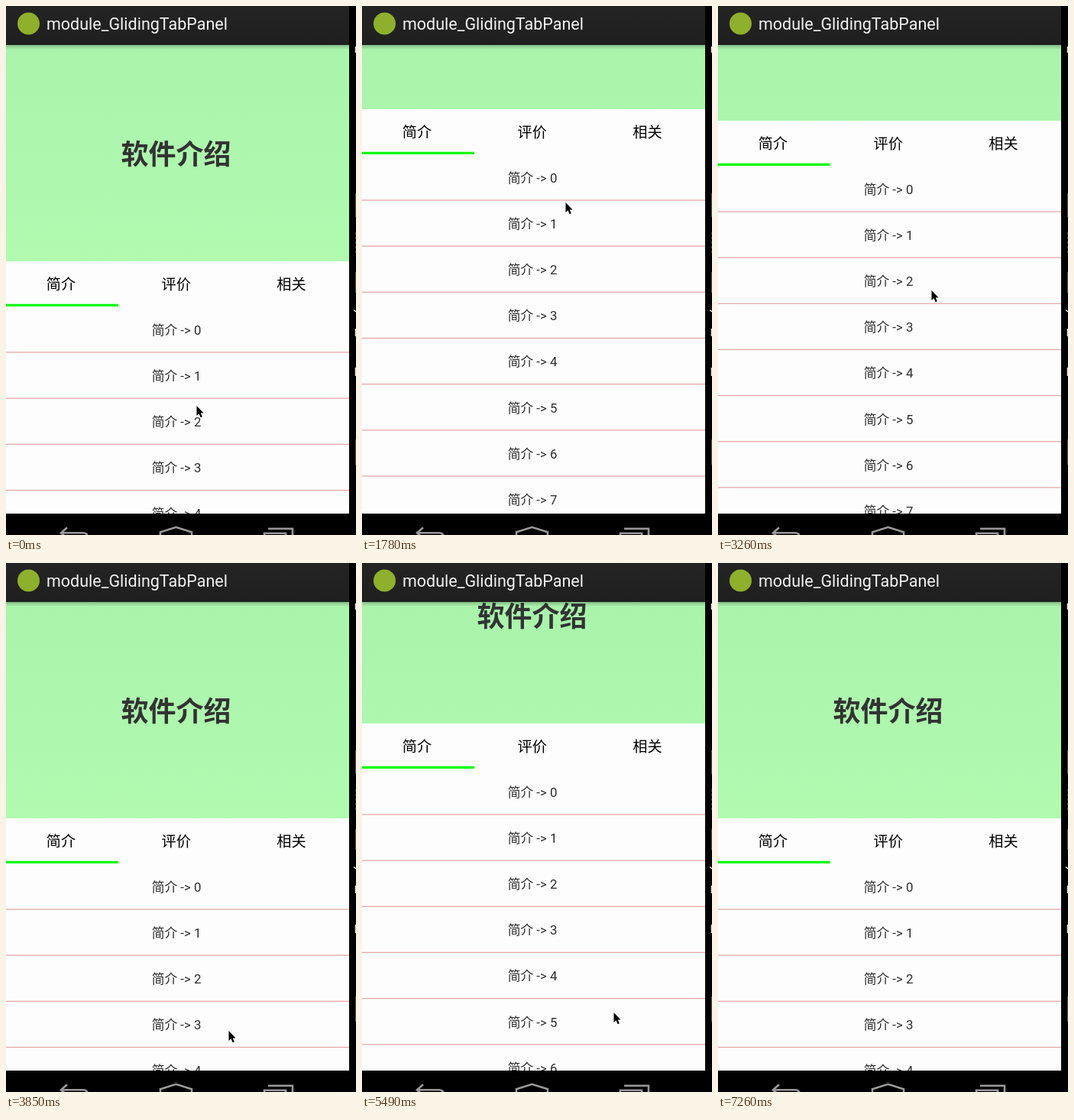
Write an HTML page that moves like this. It is 458 by 692 pixels and loops after 7.49 s.

```html
<!DOCTYPE html>
<html lang="zh-CN">
<head>
<meta charset="utf-8">
<title>Sticky tabs</title>
<style>
  html, body { margin: 0; width: 100%; height: 100%; overflow: hidden; background: #000; }
  svg { display: block; width: 458px; height: 692px; }
  text { font-family: Roboto, "Noto Sans CJK SC", "Noto Sans CJK", sans-serif; }
  .mid { text-anchor: middle; }
  .title { font-size: 21.5px; fill: #f3f3f3; }
  .intro { font-size: 36px; font-weight: bold; fill: #333; }
  .tab { font-size: 19.2px; fill: #000; }
  .row { font-size: 16.8px; fill: #2a2a2a; }
  .icon { fill: none; stroke: #999; stroke-width: 2.6; }
</style>
</head>
<body>
<svg viewBox="0 0 458 692">
  <defs>
    <linearGradient id="green" x2="0" y2="1">
      <stop stop-color="#a9f3ab"/><stop offset="1" stop-color="#b1fab0"/>
    </linearGradient>
    <linearGradient id="bar" x2="0" y2="1">
      <stop stop-color="#242424"/><stop offset="1" stop-color="#1f1f1f"/>
    </linearGradient>
    <linearGradient id="shade" x2="0" y2="1">
      <stop stop-color="#000" stop-opacity=".22"/><stop offset="1" stop-color="#000" stop-opacity="0"/>
    </linearGradient>
  </defs>

  <!-- the green stays put; the list and tabs slide over it -->
  <rect y="51" width="449" height="283" fill="url(#green)"/>
  <g id="list"></g>
  <g id="head">
    <text class="intro mid" x="222.5" y="206.5">软件介绍</text>
    <rect y="334" width="449" height="59" fill="#fdfdfd"/>
    <g id="tabs"></g>
    <rect y="389.8" width="147" height="3.2" fill="#00fa00"/>
  </g>

  <rect width="449" height="51" fill="url(#bar)"/>
  <rect y="51" width="449" height="6" fill="url(#shade)"/>
  <circle cx="29.5" cy="23" r="14.5" fill="#8eb02c"/>
  <text class="title" x="53" y="31">module_GlidingTabPanel</text>

  <rect y="664" width="458" height="28" fill="#000"/>
  <g class="icon" transform="translate(0 -.7)">
    <path d="M80 683L72 690L80 697M72 690H101Q107 690 107 697"/>
    <path d="M202 700V689L222.5 682.5L243 689V700"/>
    <path d="M343 684.5H375V700M338 700V690.5H366V700"/>
  </g>

  <rect x="449" width="9" height="692" fill="#000"/>
  <path d="M457.5 245V276M457.5 348V375M457.5 567V600" stroke="#555"/>
  <path d="M457.5 296V325" stroke="#444" stroke-dasharray="3 3"/>
  <path d="M457.5 53V61M457.5 422V432M457.5 473V484M455 397.5L458 400" stroke="#eee" stroke-width="1.5"/>

  <g id="cursor">
    <path d="M0 0V14L3.2 11.2L5.6 16.6L8 15.5L5.7 10.2H9.8Z" transform="translate(-.5 0) scale(.92)"
          fill="#000" stroke="#fff" stroke-width="1.4" paint-order="stroke" stroke-linejoin="round"/>
  </g>
</svg>
<script>
  const LOOP = 7490, TICK = 148, STICK = 283.5, PITCH = 60.16;
  const $ = id => document.getElementById(id);
  const list = $('list'), head = $('head'), cursor = $('cursor');

  const label = (kind, x, y, text) => `<text class="${kind} mid" x="${x}" y="${y}">${text}</text>`;

  $('tabs').innerHTML = ['简介', '评价', '相关']
    .map((name, i) => label('tab', 72 + i * 150.7, 371, name)).join('');

  let rows = '<rect y="334" width="449" height="960" fill="#fdfdfd"/>';
  for (let i = 0; i < 14; i++) {
    const y = i * PITCH;
    rows += label('row', 223, 429.7 + y, `简介 -&gt; ${i}`) +
      `<rect y="${452.4 + y}" width="449" height="1.2" fill="#e2a3a2"/>`;
  }
  list.innerHTML = rows;

  // each drag eases the pose to its end values between two ticks
  const rest = { x: 250, y: 523, scroll: 0 };
  const drags = [
    { from: 2, to: 8, x: 267, y: 325, scroll: 108 },
    { from: 10, to: 15, x: 267, y: 132, scroll: 367 },
    { from: 18, to: 26, x: 292, y: 612, scroll: 0 },
    { from: 26, to: 31, x: 306, y: 129, scroll: 389 },
    { from: 32, to: 37, x: 330, y: 588, scroll: 124 },
    { from: 37, to: 43, x: 338, y: 670, scroll: 0 },
    { from: 45, to: 49, x: 382, y: 700, scroll: 0 }
  ];

  const clamp = u => Math.min(1, Math.max(0, u));
  const ease = u => u * u * (3 - 2 * u);
  const mix = (a, b, u) => Math.round(a + (b - a) * u);

  const pose = tick => drags.reduce((p, d) => {
    const u = ease(clamp((tick - d.from) / (d.to - d.from)));
    return { x: mix(p.x, d.x, u), y: mix(p.y, d.y, u), scroll: mix(p.scroll, d.scroll, u) };
  }, rest);

  const move = (el, x, y) => el.setAttribute('transform', `translate(${x} ${y})`);

  function draw() {
    const t = performance.now() % LOOP;
    const { x, y, scroll } = pose(Math.floor((t + 8) / TICK));
    move(list, 0, -scroll);
    move(head, 0, -Math.min(scroll, STICK));
    move(cursor, x, y);
    requestAnimationFrame(draw);
  }
  draw();
</script>
</body>
</html>
```
